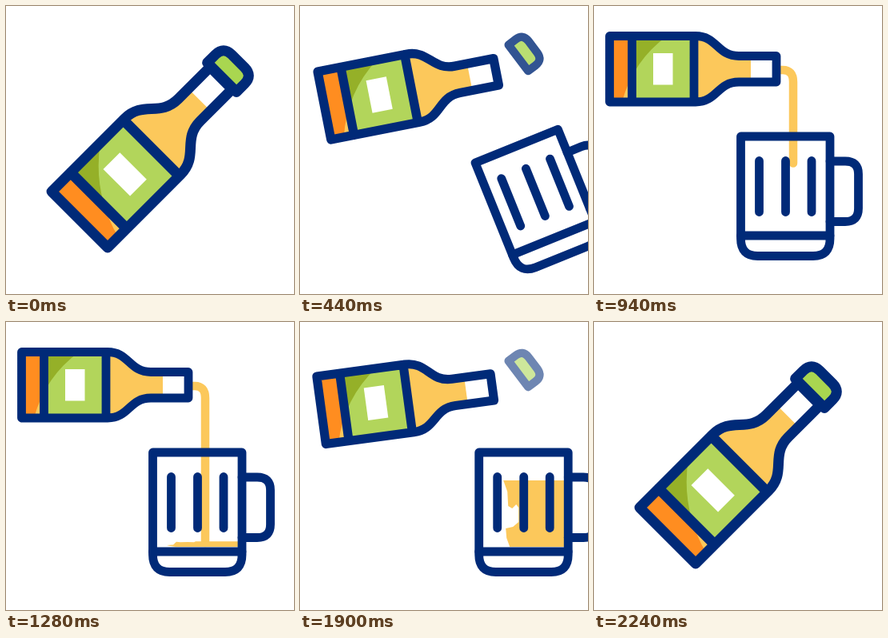
Animation of 360 by 360 pixels, one loop 2.4 s. Source, as an HTML page:

```html
<!DOCTYPE html>
<html lang="en">
<head>
<meta charset="utf-8">
<title>Bottle and mug</title>
<style>
html, body { margin: 0; width: 100%; height: 100%; overflow: hidden; background: #fff; }
svg { display: block; width: 100%; height: 100%; }
.line { stroke: #002a78; stroke-width: 10.8; stroke-linecap: round; stroke-linejoin: round; }
</style>
</head>
<body>
<svg viewBox="0 0 360 360" fill="none">
  <clipPath id="shade"><path d="M14 37H92Q49 68 35 120H14Z"/></clipPath>

  <path id="stream" d="M230 80H236Q249 80 249 95V276" pathLength="1" stroke="#fcc85b" stroke-width="10.5" stroke-linecap="round"/>

  <g id="mug">
    <polygon id="beer" fill="#fcc85b"/>
    <g class="line">
      <path d="M183.5 163H295V291Q295 312.5 274 312.5H204.500Q183.500 312.5 183.500 291Z"/>
      <path d="M183.5 287H295M206.500 193.500V257.500M239.500 193.500V257.500M272 193.500V257.500"/>
      <path d="M295 194H314Q330.500 194 330.500 210V253Q330.500 269.500 314 269.500H295"/>
    </g>
  </g>

  <g id="bottle">
    <path id="glass" fill="#fcc85b" d="M19.500 37.500H127C154 37.500 154 62.500 181 62.500H228V95H181C154 95 154 120 127 120H19.500Z"/>
    <path fill="#fff" d="M196 62.500H228V95H196Z"/>
    <path fill="#b2d55b" d="M47 37.500H125V120H47Z"/>
    <g clip-path="url(#shade)">
      <path fill="#ff8d20" d="M19 37H47V120H19Z"/>
      <path fill="#95b028" d="M47 37H125V120H47Z"/>
    </g>
    <path fill="#fff" d="M74 59H98.500V98.500H74Z"/>
    <use href="#glass" style="fill-opacity:0"/>
    <path class="line" d="M19.500 37.500H127C154 37.500 154 62.500 181 62.500H228V95H181C154 95 154 120 127 120H19.500ZM47.500 37.500V120M125 37.500V120"/>
  </g>

  <g id="cap">
    <path class="line" fill="#a9d650" d="M229 57.250H241Q253 57.250 253 69.250V88.250Q253 100.250 241 100.250H229Z"/>
  </g>
</svg>
<script>
const LOOP = 2400;
const [stream, mug, beer, bottle, cap] =
  ['stream', 'mug', 'beer', 'bottle', 'cap'].map(id => document.getElementById(id));

// Left edge of the beer, top to bottom: while filling and when full
const FILLING = [[237, 228], [235, 236], [227, 234], [218, 237], [213, 233], [211, 245],
  [210, 256], [209, 262], [201, 265], [204, 272], [212, 281]];
const FULL = [[214, 198], [219, 212], [220, 230], [225, 233], [230, 228], [233, 232],
  [233, 250], [226, 256], [217, 258], [218, 270], [222, 281]];
const FLOOR = 281, DEPTH = 83, HALF = 0.64;

const mix = (a, b, k) => a + (b - a) * k;
const ramp = (t, from, to) => Math.min(1, Math.max(0, (t - from) / (to - from)));
const ease = (t, from, to) => {
  const k = ramp(t, from, to);
  return k * k * (3 - 2 * k);
};
const place = (el, x, y, angle, scale, cx, cy) => el.setAttribute('transform',
  `translate(${x} ${y}) rotate(${angle}) scale(${scale}) translate(${-cx} ${-cy})`);

function beerPoints(level) {
  const k = ramp(level, HALF, 1);
  const top = FLOOR - DEPTH * level;
  const edge = FILLING.map(([x, y], i) => {
    const low = (FLOOR - y) / (DEPTH * HALF);
    const high = (FLOOR - FULL[i][1]) / DEPTH;
    return [mix(x, FULL[i][0], k), FLOOR - DEPTH * level * mix(low, high, k)];
  });
  return [[290, FLOOR], [290, top], ...edge].join(' ');
}

function draw(t) {
  const pour = ease(t, 120, 595) - ease(t, 1780, 2240);
  place(bottle, mix(180.5, 123.75, pour), mix(178.5, 78.75, pour),
    mix(-45, 0, pour), mix(1.2, 1, pour), 123.75, 78.75);

  const pop = ease(t, 120, 430) - ease(t, 1890, 2240);
  place(cap, mix(280, 282, pop), mix(79, 58, pop),
    mix(-45, -37, pop), mix(1.2, 0.95, pop), 241, 78.75);
  cap.setAttribute('opacity', 1 - ramp(t, 430, 485) + ramp(t, 1870, 1925));

  place(mug, 257 + 235 * (1 - pour), 237.5, -22 * (1 - ease(t, 620, 820)), 1, 257, 237.5);

  const head = ease(t, 720, 1100), tail = ease(t, 1400, 1740);
  stream.setAttribute('visibility', head > tail ? 'visible' : 'hidden');
  stream.setAttribute('stroke-dasharray', `${head - tail} 2`);
  stream.setAttribute('stroke-dashoffset', -tail);

  beer.setAttribute('points', beerPoints(ramp(t, 1240, 1740)));
}

const start = performance.now();
function tick() {
  draw((performance.now() - start) % LOOP);
  requestAnimationFrame(tick);
}
tick();
</script>
</body>
</html>
```
